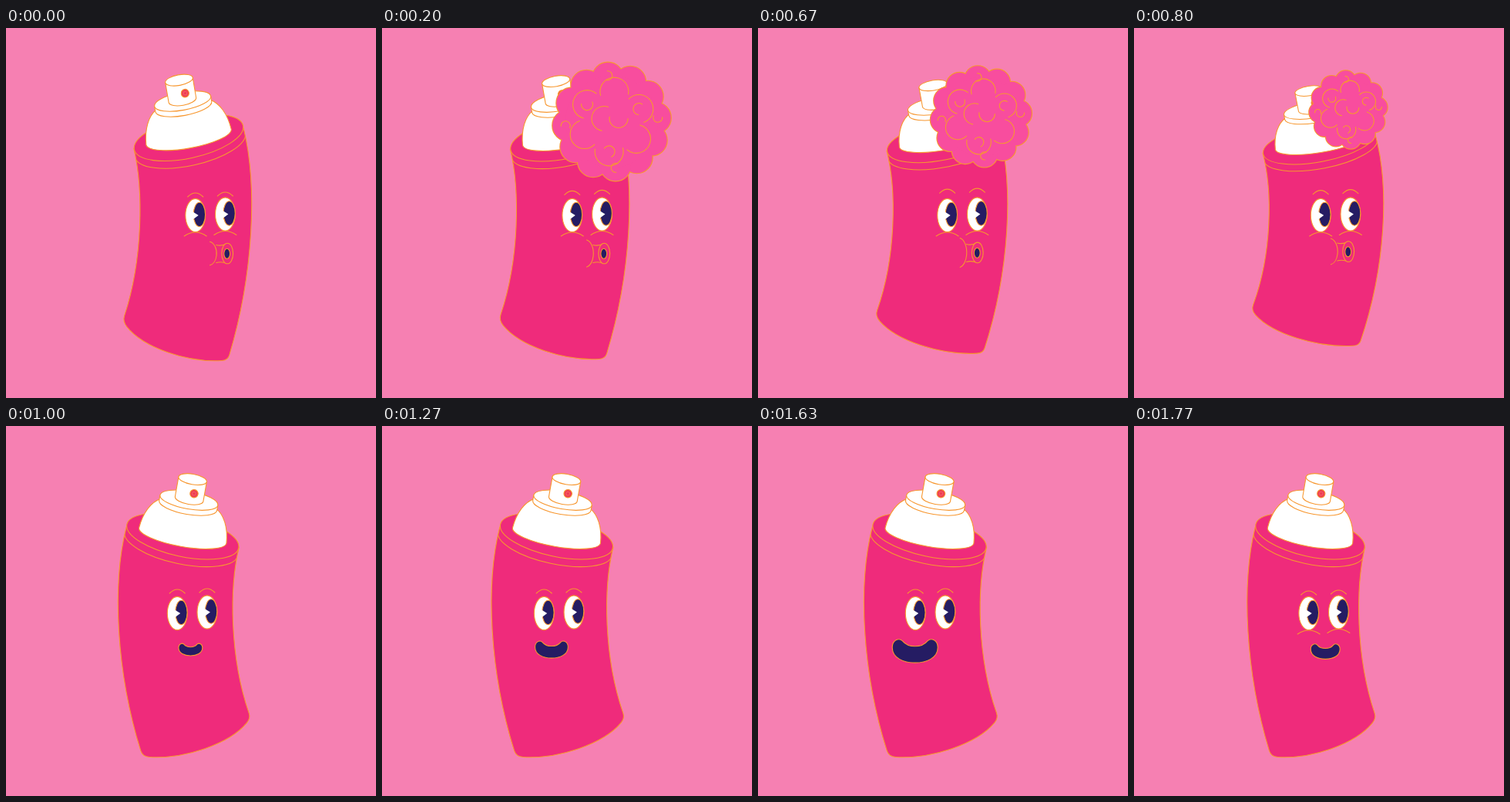
An HTML page with a canvas for the animation above (1.81 s loop, 480 px wide and 480 px high).

```html
<!DOCTYPE html>
<html>
<head>
<meta charset="utf-8">
<style>
html, body { margin: 0; height: 100%; overflow: hidden; background: #f680b2; }
canvas { display: block; width: 100vw; height: 100vh; }
</style>
</head>
<body>
<canvas id="stage" width="480" height="480"></canvas>
<script>
const ctx = document.getElementById('stage').getContext('2d');
const BG = '#f680b2', BODY = '#ef2b7b', PUFF = '#f84d9e', LINE = '#f7972f', NAVY = '#251c63', WHITE = '#fff';
const LOOP = 1810, STEPS = 54, RAD = Math.PI / 180;

// can sides when leaning fully to the left: top, two handles, corner, bottom handle
const OUTER = [[-73, 131], [-92, 205], [-86, 320], [-52, 429], [2, 432]];
const INNER = [[73, 157], [60, 210], [61, 300], [88, 379], [60, 413]];

// everything moves in five overlapping phases
function poseAt(n) {
  const ramp = (a, b) => Math.min(1, Math.max(0, (n - a) / (b - a)));
  const blow = ramp(0, 14), squash = ramp(17, 24), flip = ramp(24, 28), grin = ramp(28, 49), back = ramp(49, 53);
  const glide = 1 - (1 - grin) ** 2;
  const smiling = n >= 26;
  const eyeX = 245.7 + 2.5 * blow - 6 * squash - 16 * flip - 22 * glide + 22.5 * back;
  return {
    smiling,
    cheeks: !smiling || n > 50,
    x: 237 + 3 * blow - 10 * flip - 7.5 * grin + 6 * back,
    lean: 2 * flip - 1,
    width: .975 + .025 * blow + .015 * grin - .04 * back,
    stretch: 1 + .02 * Math.sin(Math.PI * ramp(-1, 5)) - .082 * (squash - flip),
    eyeX,
    browY: 214 - 6 * blow + 4 * ramp(17, 28) + 2 * back,
    mouthX: eyeX + 41 - 5.5 * squash - 16.5 * flip - 19.5 * grin + 22 * back,
    mouthY: 292.5 - 2.5 * squash + 2.5 * ramp(38, 53),
    mouthSize: smiling ? 14 + 15.5 * grin - 10.5 * back : 15.5 + 5.5 * blow - 4 * squash,
    puff: ramp(0, 4) - .34 * squash - .66 * flip
  };
}

function shape(fill, draw, line = LINE) {
  ctx.beginPath();
  draw();
  if (fill) { ctx.fillStyle = fill; ctx.fill(); }
  if (line) { ctx.strokeStyle = line; ctx.stroke(); }
}

function oval(x, y, rx, ry, fill, line = LINE, tilt = 0) {
  shape(fill, () => ctx.ellipse(x, y, rx, ry, tilt, 0, 7), line);
}

function curl(x, y, r, from, to) {
  shape(null, () => ctx.arc(x, y, r, from * RAD, to * RAD));
}

// cylinder side with a curved front
function drum(rx, ry, top, bottom) {
  shape(WHITE, () => {
    ctx.moveTo(-rx, top);
    ctx.lineTo(-rx, bottom);
    ctx.ellipse(0, bottom, rx, ry, 0, Math.PI, 0, true);
    ctx.lineTo(rx, top);
  });
  oval(0, top, rx, ry, WHITE);
}

function side(lean, near, far) {
  const u = (lean + 1) / 2;
  return near.map(([x, y], i) => [x * u - far[i][0] * (1 - u), y * u + far[i][1] * (1 - u)]);
}

function toward([x, y], [tx, ty], dist) {
  const k = dist / Math.hypot(tx - x, ty - y);
  return [x + (tx - x) * k, y + (ty - y) * k];
}

function can({ x, lean, width, stretch }) {
  const l = side(lean, OUTER, INNER), r = side(lean, INNER, OUTER);
  const tilt = 12 * lean * RAD;
  const curve = (a, b, c) => ctx.bezierCurveTo(...a, ...b, ...c);
  ctx.save();
  ctx.transform(width, 0, 0, stretch, x, 221 * (1 - stretch));

  const outline = () => {
    ctx.moveTo(...l[0]);
    curve(l[1], l[2], toward(l[3], l[2], 8));
    ctx.quadraticCurveTo(...l[3], ...toward(l[3], l[4], 9));
    curve(l[4], r[4], toward(r[3], r[4], 8));
    ctx.quadraticCurveTo(...r[3], ...toward(r[3], r[2], 7));
    curve(r[2], r[1], r[0]);
  };
  shape(BODY, outline);
  oval(0, 143, 74, 26.3, BODY, LINE, tilt);
  ctx.save();
  ctx.beginPath();
  outline();
  ctx.clip();
  shape(null, () => ctx.ellipse(-2 * lean, 152.5, 75, 26.3, tilt, 0, Math.PI));
  ctx.restore();

  ctx.translate(0, 142);
  ctx.rotate(10 * lean * RAD);
  shape(WHITE, () => {
    ctx.moveTo(36, -42);
    ctx.bezierCurveTo(48, -36, 56, -20, 57.5, 0);
    ctx.ellipse(0, 0, 57.5, 14.5, 0, 0, Math.PI);
    ctx.bezierCurveTo(-56, -20, -48, -36, -36, -42);
  });
  drum(38, 11.5, -46.5, -39.5);
  drum(18.5, 6.8, -74, -48);
  oval(5, -56, 5.2, 5.2, '#ee3a56');
  oval(5, -56, 2.3, 2.3, null, '#f4625f');
  ctx.restore();
}

function arch(x, y, half, rise, fill) {
  shape(fill, () => {
    ctx.moveTo(x - half, y + rise);
    ctx.quadraticCurveTo(x, y - rise, x + half, y + rise);
  });
}

function eye(x, y, browY, cheeks) {
  oval(x, y, 12.9, 21.6, WHITE);
  oval(x + 5.2, y - 1, 7.7, 15.7, NAVY);
  shape(WHITE, () => {
    ctx.moveTo(x - 4, y - 5);
    ctx.lineTo(x + 4, y);
    ctx.lineTo(x - 4, y + 6);
  }, null);
  arch(x, browY, 10, 5);
  if (cheeks) arch(x, y + 22, 14.5, 5, BODY);
}

function pucker(x, y, p) {
  shape(BODY, () => {
    ctx.moveTo(x - 14, y - 11);
    ctx.quadraticCurveTo(x - 7, y - 9, x, y - 13);
    ctx.lineTo(x, y + 13);
    ctx.quadraticCurveTo(x - 7, y + 10, x - 14, y + 12);
  });
  shape(null, () => ctx.ellipse(x - 24, y, 10.5, p, 0, -80 * RAD, 80 * RAD));
  oval(x + .5, y, 7.4, 13.3, BODY);
  oval(x, y + .3, 3.9, 6.5, NAVY);
}

function smile(x, y, w) {
  const h = w * .52;
  const to = (...v) => ctx.bezierCurveTo(...v.map((q, i) => i % 2 ? y + q * h : x + q * w));
  shape(NAVY, () => {
    ctx.moveTo(x - w, y - .3 * h);
    to(-1, -.9, -.72, -1.15, -.55, -.85);
    to(-.3, -.25, .3, -.25, .55, -.85);
    to(.72, -1.15, 1, -.9, 1, -.3);
    to(1, .6, .5, 1, 0, 1);
    to(-.5, 1, -1, .6, -1, -.3);
  });
}

// calls draw(x, y, degrees, index) around a circle
function ring(count, radius, first, draw) {
  for (let i = 0; i < count; i++) {
    const a = first + 360 / count * i;
    draw(radius * Math.cos(a * RAD), radius * Math.sin(a * RAD), a, i);
  }
}

// grows out of the nozzle
function cloud(s) {
  if (s < .02) return;
  ctx.save();
  ctx.translate(239, 76);
  ctx.scale(s, s);
  ctx.translate(59, 45.5);
  const bumps = (fill, line) => ring(12, 57, -95, (x, y) => oval(x, y, 20, 20, fill, line));
  ctx.lineWidth = 2.2 / s;
  bumps(null, LINE);
  bumps(PUFF, null);
  oval(0, 0, 60, 60, PUFF, null);

  ctx.lineWidth = 1.1 / s;
  ring(12, 60, -95, (x, y, a, i) => { if (i % 3 === 0) curl(x, y, 6, a, a + 210); });
  ring(6, 39, 35, (x, y, a, i) => {
    curl(x, y, 18.5, a - 110, a + 95);
    if (i % 2) curl(x, y, 7.5, a + 120, a + 330);
  });
  curl(-10, -4, 16, 100, 290);
  curl(9, -4, 12, 0, 190);
  ctx.restore();
}

function render(ms) {
  const pose = poseAt(Math.min(STEPS - 1, Math.floor((ms % LOOP + 4) * .03)));
  ctx.fillStyle = BG;
  ctx.fillRect(0, 0, 480, 480);
  ctx.lineWidth = 1.1;
  ctx.lineCap = ctx.lineJoin = 'round';
  can(pose);
  eye(pose.eyeX, 243, pose.browY, pose.cheeks);
  eye(pose.eyeX + 38.7, 241.5, pose.browY - 1, pose.cheeks);
  const mouth = pose.smiling ? smile : pucker;
  mouth(pose.mouthX, pose.mouthY, pose.mouthSize);
  cloud(pose.puff);
}

const start = performance.now();
function tick() {
  render(performance.now() - start);
  requestAnimationFrame(tick);
}
tick();
</script>
</body>
</html>
```
